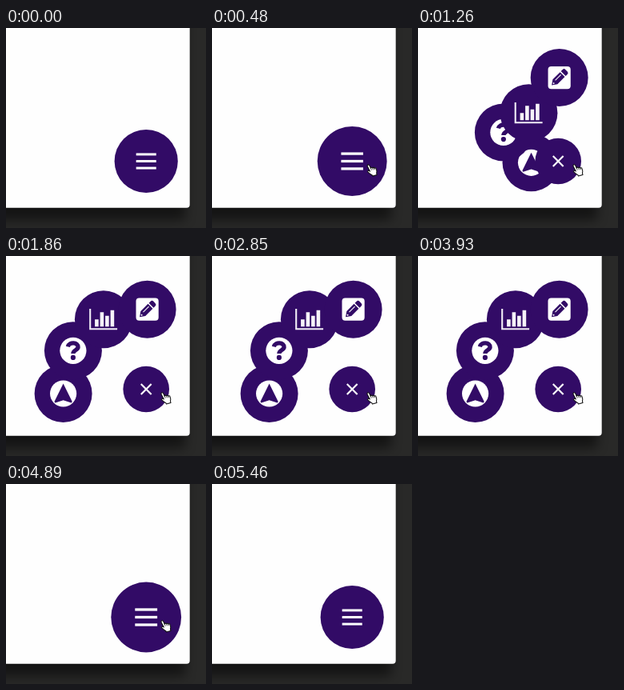
Write an HTML page that moves like this. It is 250 px wide and 250 px high and loops after 5490 ms.

```html
<!DOCTYPE html>
<html lang="en">
<head>
<meta charset="utf-8">
<title>Circular menu</title>
<style>
html, body { margin: 0; width: 100%; height: 100%; overflow: hidden; background: #292928; }
svg { display: block; width: 100vw; height: 100vh; }
</style>
</head>
<body>
<svg viewBox="0 0 250 250">
  <defs>
    <filter id="blur" x="-20%" y="-20%" width="140%" height="140%"><feGaussianBlur stdDeviation="7"/></filter>
  </defs>
  <rect width="250" height="250" fill="#292928"/>
  <rect x="-40" y="-40" width="264" height="280" rx="4" fill="#000" opacity=".5" filter="url(#blur)"/>
  <rect x="-20" y="-20" width="249.7" height="244.7" rx="4" fill="#fefefe"/>
  <g fill="#320b66">
    <g class="item">
      <circle r="36"/>
      <circle r="16.6" fill="#fff"/>
      <path d="M0-12.6 L11 9.8 Q11.2 11.8 9.2 11.3 L0 8.2 L-9.2 11.3 Q-11.2 11.8-11 9.8Z"/>
    </g>
    <g class="item">
      <circle r="36"/>
      <circle r="16.6" fill="#fff"/>
      <path d="M-6.5-5 C-5-11.4 6.6-10.6 6.2-4.3 C5.9-.6 0-.6 0 3.6" fill="none" stroke="#320b66" stroke-width="5.3"/>
      <circle cy="8.6" r="3.1"/>
    </g>
    <g class="item">
      <circle r="36"/>
      <path d="M-16.7-13.3 V12 H17.2" fill="none" stroke="#f1edf6" stroke-width="2.1"/>
      <path d="M-10.8 0h4.6v9h-4.6z M-4.3-9h4.6v18h-4.6z M2.2-4.5h4.6V9H2.2z M8.7-11.5h4.6V9H8.7z" fill="#f6f3f9"/>
    </g>
    <g class="item">
      <circle r="36"/>
      <rect x="-14.1" y="-14.1" width="28.2" height="28.2" rx="4" fill="#fff"/>
      <g transform="rotate(-45)">
        <path d="M-13.5 0 L-7.5-4.2 H5.5 V4.2 H-7.5Z M7-4.2 H10 Q12.5-4.2 12.5-1.8 V1.8 Q12.5 4.2 10 4.2 H7Z"/>
        <path d="M-6-1.2 H4" stroke="#fff" stroke-width="1"/>
        <circle cx="-10" r="1" fill="#fff"/>
      </g>
    </g>
    <g id="button">
      <circle r="36"/>
      <g fill="#fff">
        <rect class="line" x="-11.4" y="-1.35" width="22.8" height="2.7"/>
        <rect class="line" x="-11.4" y="-1.35" width="22.8" height="2.7"/>
        <rect class="line" x="-11.4" y="-1.35" width="22.8" height="2.7"/>
      </g>
    </g>
  </g>
  <g id="hand" stroke="#111" stroke-linejoin="round" stroke-linecap="round">
    <path fill="#fff" stroke-width="1.2"
      d="M-3.5-6.6 C-2.4-8-.9-7-.6-5.8 L.3-2 C1.1-3 2.5-2.8 2.9-1.6 C3.7-2.4 5-2 5.3-.9 C6.4-1.4 7.5-.6 7.6.6 C8 3.2 7.6 5 6.7 6.8 L6.8 9 L.4 9.4 L.1 7.8 C-1.8 6.6-3.2 4.6-4.6 2.6 C-5.2 1.3-3.8.4-2.6 1.2 L-1.6 2.2 L-3.7-5.4Z"/>
    <path fill="none" stroke-width=".8" d="M.3-2 L.7.6 M2.9-1.6 L3.2.8 M5.3-.9 L5.5 1.2"/>
  </g>
</svg>
<script>
const LOOP = 5490, HOME = [175.2, 166.5];
const ENTER = 170, OPEN = 1030, CLOSE = 4545, LEAVE = 4990;

// Listed from the back of the stack to the front
const ITEMS = [
  { x: -103.6, y: 5.5, time: 440 },
  { x: -91.3, y: -48.2, time: 370 },
  { x: -53.3, y: -87.2, time: 376 },
  { x: 1.4, y: -99.8, time: 264 }
];

const clamp = v => Math.max(0, Math.min(1, v));
const mix = (a, b, k) => a + (b - a) * k;

function bezier(x1, y1, x2, y2) {
  const at = (s, a, b) => 3 * (1 - s) * (1 - s) * s * a + 3 * (1 - s) * s * s * b + s * s * s;
  return v => {
    v = clamp(v);
    if (v === 0 || v === 1) return v;
    let lo = 0, hi = 1;
    for (let i = 0; i < 24; i++) {
      const mid = (lo + hi) / 2;
      if (at(mid, x1, x2) < v) lo = mid; else hi = mid;
    }
    return at(lo, y1, y2);
  };
}

const burst = bezier(.935, 0, .34, 1.33);
const back = bezier(.175, .885, .32, 1.275);
const ease = bezier(.25, .1, .25, 1);
const easeOut = bezier(0, 0, .58, 1);
const glide = bezier(.3, 0, .4, 1);

const items = [...document.querySelectorAll(".item")];
const lines = [...document.querySelectorAll(".line")];
const button = document.getElementById("button");
const hand = document.getElementById("hand");

const place = (el, x, y, rest = "") =>
  el.setAttribute("transform", `translate(${x.toFixed(3)} ${y.toFixed(3)}) ${rest}`);

function buttonScale(t) {
  if (t < OPEN) return mix(1.1, 1.2, back((t - ENTER) / 400));
  if (t < CLOSE) return mix(1.2, .8, clamp((t - OPEN) / 200));
  if (t < LEAVE) return mix(.8, 1.2, back((t - CLOSE) / 400));
  return mix(1.2, 1.1, back((t - LEAVE) / 400));
}

function draw(t) {
  const closing = easeOut((t - CLOSE) / 180);
  ITEMS.forEach((m, i) => {
    const k = burst((t - OPEN) / m.time) * (1 - closing);
    place(items[i], HOME[0] + m.x * k, HOME[1] + m.y * k);
  });

  place(button, ...HOME, `scale(${buttonScale(t).toFixed(4)})`);
  const cross = ease((t - OPEN) / 200) - ease((t - CLOSE) / 200);
  place(lines[0], 0, -7.8 * (1 - cross), `rotate(${45 * cross})`);
  place(lines[1], 0, 0, `scale(${1 - .9 * cross} 1)`);
  place(lines[2], 0, 7.8 * (1 - cross), `rotate(${-45 * cross})`);

  const near = glide((t - 30) / 480) - glide((t - 4910) / 160);
  place(hand, mix(262, 198.3, near), mix(212, 176.8, near), "rotate(-12) scale(.9)");
}

const start = performance.now();
function tick() {
  draw((performance.now() - start) % LOOP);
  requestAnimationFrame(tick);
}
draw(0);
requestAnimationFrame(tick);
</script>
</body>
</html>
```
